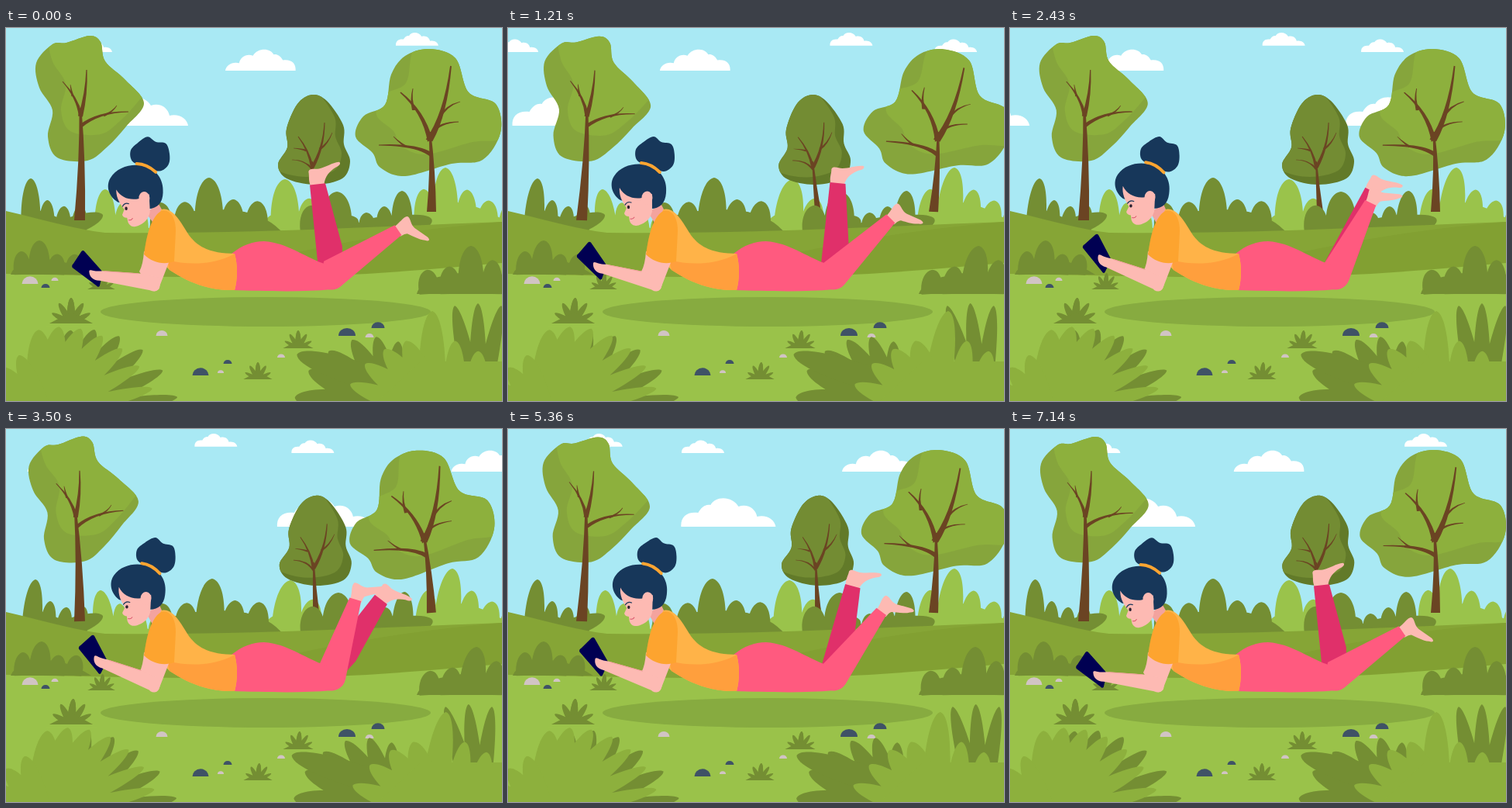
An HTML page that plays this animation: 640x481 px, repeating every 7210 ms.

```html
<!DOCTYPE html>
<html lang="en">
<head>
<meta charset="utf-8">
<title>Reading in the park</title>
<style>
html, body { margin: 0; width: 100%; height: 100%; overflow: hidden; background: #a9e9f4; }
svg { display: block; width: 100%; height: 100%; }
</style>
</head>
<body>
<svg id="stage" viewBox="0 0 640 481" preserveAspectRatio="none"></svg>
<script>
const LOOP = 7210, STEPS = 101;
const C = {
  dark: '#748e33', light: '#9ac34b', leaf: '#8db03d', shade: '#86a53c', wood: '#6b4423',
  skin: '#fdbab3', skinDark: '#f3a39e', hair: '#17375a', pants: '#ff5a7f', pantsDark: '#e0306a',
  pale: '#d1c4c4', slate: '#3f5266'
};

// ---- motion: every function takes u, the part of the loop that has passed
const { PI, sin, cos, min, max, abs, exp } = Math;
const sway = a => u => a * sin(3 * PI * u);
const pulse = a => u => a * sin(3 * PI * u) ** 2;
const settle = a => u => a * min(1, 3 * sin(PI * u));
const swing = u => cos(2 * PI * (u + 0.007));
const lift = u => (1 - cos(PI * min(1, u * 3, max(0, (0.99 - u) * 3)))) / 2;

const movers = [];
const move = (transform, inner) => {
  movers.push(transform);
  return `<g id="m${movers.length - 1}">${inner}</g>`;
};
const turn = (angle, x, y, inner) => move(u => `rotate(${angle(u)} ${x} ${y})`, inner);
const lean = (shift, base, height, inner) => move(u => {
  const k = shift(u) / height;
  return `matrix(1 0 ${-k} 1 ${k * base} 0)`;
}, inner);

// ---- shapes
const fill = (d, color) => `<path d="${d}" fill="${color}"/>`;
const line = (d, color, w) =>
  `<path d="${d}" fill="none" stroke="${color}" stroke-width="${w}" stroke-linecap="round"/>`;

// closed smooth curve through the points "x,y x,y ..."
const smooth = text => {
  const p = text.split(' ').map(s => s.split(',').map(Number)), n = p.length;
  return p.reduce((d, b, k) => {
    const a = p[(k + n - 1) % n], c = p[(k + 1) % n], e = p[(k + 2) % n];
    return d + `C${b.map((v, j) => v + (c[j] - a[j]) / 6)} ${c.map((v, j) => v - (e[j] - b[j]) / 6)} ${c}`;
  }, `M${p[0]}`) + 'Z';
};

// maps (along, across) on the way from a to b to a point, across in pixels
const frame = (ax, ay, bx, by) => {
  const dx = bx - ax, dy = by - ay, len = Math.hypot(dx, dy);
  return (u, v) => `${(ax + dx * u - dy / len * v).toFixed(1)} ${(ay + dy * u + dx / len * v).toFixed(1)} `;
};
const leaf = (rx, ry, tx, ty, w) => {
  const p = frame(rx, ry, tx, ty);
  return `M${p(0, -w)}C${p(0.5, -1.25 * w)}${p(0.97, -0.85 * w)}${p(1, 0)}C${p(0.97, 0.85 * w)}${p(0.5, 1.25 * w)}${p(0, w)}Z`;
};
// tapered branch from a to c, bent towards b
const limb = (w, ax, ay, bx, by, cx, cy) => {
  const p = frame(ax, ay, cx, cy), q = frame(bx, by, cx, cy);
  return fill(`M${p(0, -w / 2)}Q${q(0, -w * 0.28)}${p(1, -w * 0.1)}L${p(1, w * 0.1)}Q${q(0, w * 0.28)}${p(0, w / 2)}Z`, C.wood);
};

const mix = ([a, b], t) => a + (b - a) * t;
// n leaves from one root; angle, length and half width run from first to last
const fan = (color, x, y, n, angles, lengths, widths) => {
  let d = '';
  for (let k = 0; k < n; k++) {
    const t = n > 1 ? k / (n - 1) : 0, a = mix(angles, t) * PI / 180, len = mix(lengths, t);
    d += leaf(x, y, x + len * cos(a), y - len * sin(a), mix(widths, t));
  }
  return fill(d, color);
};
// a row of round leaves that gets lower away from its peak
const hedge = (color, shift, left, right, peak, base, h, w) => {
  const gap = w * 1.65;
  let d = `M${left} ${base}Q${left + 6} ${base - h * 0.4} ${peak} ${base - h * 0.45}T${right} ${base}Z`;
  for (let k = Math.ceil((left + w / 2 - peak) / gap); peak + k * gap < right - w / 2; k++) {
    const tall = k ? h * (0.42 + 0.38 * exp(-abs(k) * gap / 50) + 0.07 * sin(k * 5 + peak)) : h;
    const x = peak + k * gap;
    d += leaf(x - k, base, x, base - tall, k ? w * 0.72 : w * 0.9);
  }
  return lean(shift, base, h, fill(d, color));
};
const tuft = (x, y, size) => lean(settle(size / 12), y, size,
  fan(C.dark, x, y, 3, [90, 28], [size, size * 0.85], [size / 7, size / 10]) +
  fan(C.dark, x, y, 3, [90, 152], [size, size * 0.85], [size / 7, size / 10]) +
  fill(`M${x - size * 0.85} ${y}L${x} ${y - size * 0.45}L${x + size * 0.85} ${y}Z`, C.dark)) +
  fill(`M${x - size} ${y}h${size * 2}v${size / 8}h${-size * 2}Z`, '#9ac24a');

const stones = (color, text) => text.split(' ').map(s => {
  const [x, y, w] = s.split(',').map(Number);
  return fill(`M${x - w / 2} ${y}A${w / 2} ${w * 0.46} 0 0 1 ${x + w / 2} ${y}Z`, color);
}).join('');

// the light part of a crown is the crown itself, shifted and cut off at its edge
let clips = 0;
const crown = (points, shade, light, dx, dy) => {
  const d = smooth(points), id = 'crown' + clips++;
  return `<clipPath id="${id}"><path d="${d}"/></clipPath>` + fill(d, shade) +
    `<g clip-path="url(#${id})"><g transform="translate(${dx} ${dy})">${fill(d, light)}</g></g>`;
};

// one trip of a cloud is as long as the gap to the next; bend bows its pace
const cloud = (x, y, gap, bend, scale, flip = 1) => {
  const d = 'M-61 37C-62 24-53 17-39 19C-34 10-28 8-23 9C-17-3 5-3 13 11C25 7 35 14 37 24C49 21 60 28 61 37Z';
  const one = dx => `<g transform="translate(${dx + 61 * scale} 0) scale(${scale * flip} ${scale})">${fill(d, '#fff')}</g>`;
  return move(u => `translate(${x - gap * u + bend * sin(PI * u)} ${y})`, one(0) + one(gap));
};

// ---- scenery
const sky = '<rect width="640" height="481" fill="#a9e9f4"/>' +
  cloud(113, 89, 530, -36, 1) + cloud(283, 27.5, 547, 10, 0.743, -1) +
  cloud(503, 6, 568, 16, 0.45) + cloud(82, 14.3, 566, -5, 0.45);

const bushes =
  hedge(C.light, pulse(-6), 98, 208, 128, 270, 62, 14) +
  hedge(C.light, pulse(7), 325, 418, 360, 268, 73, 19) +
  hedge(C.light, settle(9), 522, 665, 567, 262, 82, 17) +
  hedge(C.dark, settle(6), 12, 112, 32, 268, 74, 13) +
  hedge(C.dark, pulse(4), 186, 360, 262, 268, 75, 19) +
  fill(leaf(64, 263, 125, 241, 11), C.dark);
const nearBushes =
  hedge(C.dark, pulse(2), 378, 447, 427, 266, 55, 20) + hedge(C.dark, settle(3), 440, 532, 511, 266, 56, 14);

const leftTree = turn(u => sway(2.2 + u)(u), 95, 248,
  crown('60,21 78,19 108,10 122,18 128,43 154,67 178,97 155,127 131,153 105,171 66,167 54,140 60,106 43,77 39,45', C.shade, C.leaf, 17, -34) +
  limb(14, 95, 248, 99, 170, 96, 104) + limb(6, 96, 114, 104, 85, 104, 54) + limb(5, 96, 112, 92, 90, 73, 69) +
  limb(5, 97, 126, 120, 108, 158, 108) + limb(3, 86, 88, 84, 80, 83, 73) + limb(3, 126, 113, 138, 108, 143, 100));

const midTree = turn(u => sway(-1.6)(u) * (u < 2 / 3 ? 1 : -1.7), 400, 240,
  crown('395,86 414,94 435,125 436,150 444,172 434,194 398,202 362,194 351,176 363,154 362,130 376,98', '#627a29', '#738c33', -11, -10) +
  limb(8, 400, 237, 397, 205, 395, 172) + limb(5, 395, 180, 410, 155, 411, 122) + limb(4, 395, 180, 391, 158, 377, 140) +
  limb(3, 405, 156, 415, 150, 421, 135) + limb(3, 395, 182, 386, 170, 369, 170) + limb(2.5, 387, 158, 382, 156, 371, 155));

const rightTree = turn(u => sway(4.4)(u), 549, 238,
  crown('546,27 580,39 597,83 632,98 638,135 615,170 575,175 515,191 483,180 473,161 451,140 461,114 489,99 497,60 515,36', C.shade, C.leaf, 27, -28) +
  limb(12, 549, 237, 551, 185, 547, 134) + limb(9, 546, 145, 567, 112, 574, 49) + limb(7, 547, 145, 539, 108, 509, 83) +
  limb(6, 548, 163, 530, 150, 481, 151) + limb(4, 526, 106, 522, 92, 525, 78) + limb(4, 559, 116, 568, 100, 586, 95) +
  limb(4, 550, 134, 560, 122, 584, 121) + limb(3, 516, 153, 508, 148, 500, 140));

const ground =
  fill('M0 236C45 246 85 259 128 264C300 266 480 256 640 250V330H0Z', '#86a536') +
  fill('M330 300C430 275 540 258 640 250V330H330Z', '#82a032') +
  fill('M0 317C140 320 300 324 420 319C500 316 570 309 640 303V481H0Z', '#9ac24a') +
  '<ellipse cx="335" cy="366" rx="213" ry="19" fill="#87ab40"/>' +
  hedge(C.dark, settle(3), 6, 110, 43, 318, 44, 14) + hedge(C.dark, pulse(7), 530, 668, 600, 343, 62, 17) +
  tuft(84, 381, 33) + tuft(377, 413, 23) + tuft(325, 453, 22) + tuft(123, 337, 21) +
  stones(C.pale, '31,330,21 63,326,9 201,397,15 277,445,8 355,425,10 469,399,11') +
  stones(C.slate, '51,335,11 251,448,21 286,433,11 440,397,22 480,387,17');

const foreground =
  lean(pulse(-8), 490, 100, fan(C.dark, 70, 500, 6, [83, 9], [111, 153], [15, 10])) +
  lean(settle(11), 490, 100, fan(C.leaf, 48, 500, 7, [93, 14], [111, 145], [18, 10]) +
    fan(C.leaf, 48, 500, 3, [112, 150], [84, 80], [13, 12])) +
  lean(pulse(-12), 490, 130, fan(C.dark, 609, 500, 3, [102, 78], [145, 145], [11, 10])) +
  lean(pulse(-7), 490, 70, fan(C.dark, 500, 490, 6, [174, 86], [128, 86], [17, 11]) +
    fan(C.dark, 480, 455, 1, [162, 0], [110, 0], [15, 0])) +
  hedge(C.leaf, pulse(18), 500, 700, 550, 490, 125, 18) +
  lean(pulse(10), 490, 90, fan(C.leaf, 555, 500, 4, [112, 160], [104, 118], [17, 13])) +
  fill('M470 490L535 430H660V490Z', C.leaf);

// ---- reader
const backLeg = turn(u => 22 * (0.44 - swing(u)), 420, 312,
  fill('M417 201C415 193 418 188 418 182C420 177 427 181 432 181C442 181 450 177 459 178C462 180 459 183 453 184C445 187 437 192 434 203Z', C.skin) +
  fill('M416 199L436 201L440 285L434 316L404 318L404 304Z', C.pantsDark));

const frontLeg = turn(u => 19.3 * (swing(u) - 0.44), 420, 319,
  fill('M488 242C495 235 496 228 502 226C507 227 507 235 514 239L532 247C537 250 536 253 530 252C522 253 512 249 506 248C502 249 501 251 498 253Z', C.skin) +
  fill('M488 240L499 251L434 331A18.4 18.4 0 0 1 406 331L407 303Z', C.pants));

const thigh = fill('M291 291C305 280 318 275 333 275C363 277 385 295 408 303L420 308V337C380 341 330 339 293 338Z', C.pants);

const head = turn(u => -3 + 5.7 * lift(u), 190, 240,
  fill('M181 238L197 226L204 240L192 256Z', C.skinDark) +
  fill(smooth('188,140 198,147 211,150 215,163 213,177 201,185 183,178 167,171 165,157 175,147'), C.hair) +
  fill('M145 222C133 214 131 200 137 191C146 177 165 173 180 177C197 182 206 196 204 213C203 226 196 233 184 233Z', C.hair) +
  fill('M144 206C143 216 148 225 153 232L150 239Q151 243 156 243L157 249C160 256 166 256 172 253C180 250 185 243 186 236L186 214L173 219C161 221 150 217 144 206Z', C.skin) +
  `<ellipse cx="179.5" cy="219" rx="7" ry="8.5" fill="${C.skin}"/><ellipse cx="155.5" cy="231" rx="1.7" ry="2.2" fill="#2b2030"/>` +
  line('M151 228Q154 223 159 225', C.hair, 1.2) + line('M158 246Q161 247 163 244', '#d9556b', 1) +
  line('M172 174Q185 175 196 186', '#fda531', 4));

const torso =
  fill('M200 234C215 230 225 250 234 264C248 286 270 291 295 291C299 306 299 322 295 338C262 339 235 328 211 312L190 290Z', '#ffb348') +
  fill('M208 299C240 308 275 303 295 291C299 306 299 322 295 338C262 339 235 328 211 312Z', '#ff9f3d');

const arm =
  fill('M178 288L211 300L197 336Q193 342 186 338L172 314Q177 305 178 288Z', C.skin) +
  turn(u => -7 + 14 * lift(u), 193, 330,
    fill('M103 277Q105 275 107 277L127 306Q128 308 126 310L121 324Q119 326 117 323L89 296Q88 293 91 291Z', '#000052') +
    fill('M110 303C112 300 115 305 127 305L174 314L198 322Q201 340 190 339L122 317C113 316 109 310 110 303Z', C.skin) +
    line('M130 306L172 314', C.skinDark, 1)) +
  fill('M200 236C212 233 219 244 219 262L217 301C203 306 188 302 178 292C181 270 186 245 200 236Z', '#fda42f');

const stage = document.getElementById('stage');
stage.innerHTML = sky + bushes + leftTree + midTree + rightTree + nearBushes + ground +
  backLeg + frontLeg + thigh + head + torso + arm + foreground;
const groups = movers.map((_, k) => document.getElementById('m' + k));

// the picture holds for one step of the loop at a time
const start = performance.now();
function draw(now) {
  const t = max(0, now - start) % LOOP;
  const step = min(STEPS - 1, Math.floor((t + 6) / LOOP * STEPS));
  movers.forEach((transform, k) => groups[k].setAttribute('transform', transform(step / STEPS)));
  requestAnimationFrame(draw);
}
draw(start);
</script>
</body>
</html>
```
